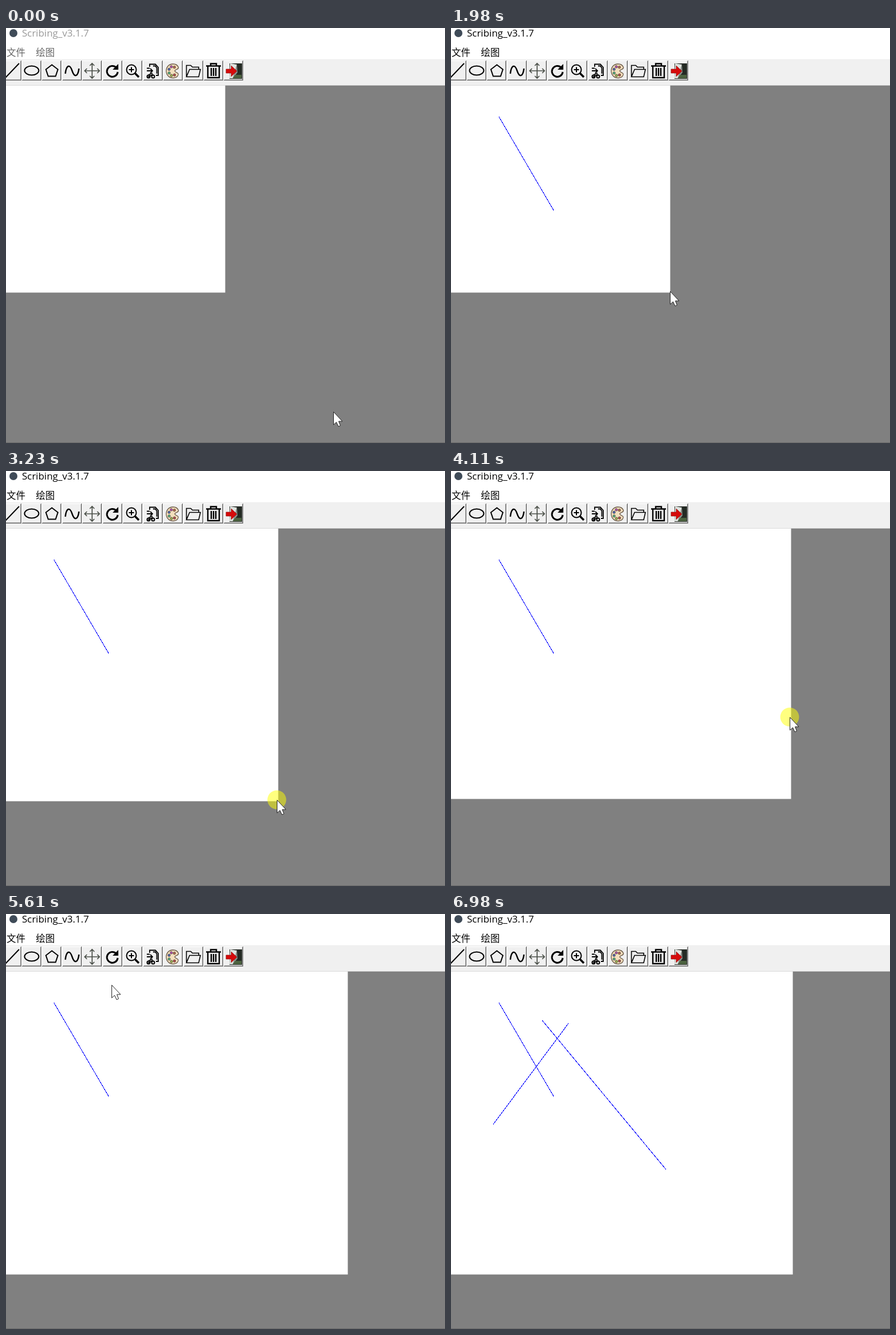
These frames come from a looping animation (770x727 px, 7.25 s). An HTML page:

```html
<!DOCTYPE html>
<html lang="zh">
<head>
<meta charset="utf-8">
<style>
  html, body { margin: 0; width: 100%; height: 100%; overflow: hidden; background: #808080; }
  svg { display: block; }
  #title { font: 17px "Open Sans", sans-serif; }
  .menu { font: 16.5px "Noto Sans CJK SC", "Noto Sans CJK", sans-serif; }
  .icon { fill: none; stroke: #000; stroke-width: 2; }
  .inactive #title { fill: #999; }
  .inactive .menu { fill: #666; }
</style>
</head>
<body>
<svg id="stage" width="770" height="727" viewBox="0 0 770 727">
  <rect width="770" height="55" fill="#fff"/>
  <rect y="54.6" width="770" height="46" fill="#f0f0f0"/>
  <rect y="726" width="770" height="1" fill="#696969"/>
  <circle cx="13" cy="9" r="7" fill="#3f4b58"/>
  <text id="title" x="28" y="15">Scribing_v3.1.7</text>
  <text class="menu" x="1" y="49">文件</text>
  <text class="menu" x="52.5" y="49">绘图</text>
  <g id="buttons" shape-rendering="crispEdges"></g>

  <g class="icon">
    <path d="M-1 87L23 62"/>
    <ellipse cx="45" cy="74.5" rx="12.5" ry="8"/>
    <path d="M80.5 64.5L91 72.5L87 84.5H74L70 72.5Z"/>
    <path d="M104 80C106 64 112 63 116 75S126 86 128 71" stroke-width="2.4"/>
    <path d="M138.5 75H164M151 62V88M142 71L138 75L142 79M160 71L164 75L160 79M147 66L151 62L155 66M147 84L151 88L155 84" stroke="#4a4f48" stroke-width="1.7"/>
    <path d="M192.5 68.5A9.5 9.5 0 1 0 196 77" stroke-width="3"/>
    <path d="M197 63V73H187Z" fill="#000" stroke="none"/>
    <circle cx="220" cy="73" r="8.5"/>
    <path d="M215.5 73H224.500M220 68.5V77.5"/>
    <path d="M226.5 79.5L233 86" stroke-width="3.5"/>
    <path d="M252 68V63.5H262L267 69V83H263M258 66.5H262L264.500 70V80M247 70.5H252M247 75H256M253 71L257 75L253 79M250 82L257 79M249 86L258 81" stroke-width="1.8"/>
    <circle cx="250" cy="85" r="2.5"/><circle cx="258" cy="85" r="2.5"/>
    <path d="M293 63C285 63 281 69 281 75C281 83 287 88 294 87.5C300 87 303 83 302 80C300 77 296 78 296 75C297 72 303 73 302.5 69C301 65 297 63 293 63Z" fill="#f3dfbd" stroke="#6b5b49" stroke-width="1.3"/>
    <g id="paints" stroke="#554b40" stroke-width=".8"></g>
    <path d="M316.5 85V65.5H324L327 68.5H338V72M316.5 85.5L322 72.5H341L338 85.5Z" stroke-width="1.6"/>
    <path d="M351 66.5H377M359 66V62.5H369V66M354 67V87H374V67M360 70V84M364 70V84M368 70V84" stroke-width="2.4"/>
  </g>
  <rect x="392" y="62" width="22" height="27" fill="#252b25"/>
  <path d="M393 62L405 64L398 88H392Z" fill="#dfe3df"/>
  <path d="M405 64L406 78L398 88Z" fill="#8b918b"/>
  <path d="M402 82H413V88H398Z" fill="#4c6340"/>
  <path d="M386 72H395V66L405 75.5L395 85V79H386Z" fill="#d60b0b" stroke="#8b1010" stroke-width=".7"/>

  <rect id="sheet" y="100.6" fill="#fff"/>
  <path id="lines" stroke="#00f" shape-rendering="crispEdges"/>
  <g id="pointer">
    <circle id="press" r="16.5" fill="#ff0" fill-opacity=".5"/>
    <path d="M.5 .5V23L5.5 18.5L9 26L12.5 24.5L9.5 17H16Z" fill="#fff" stroke="#222"/>
  </g>
</svg>
<script>
const $ = id => document.getElementById(id);
const TICK = 125, LOOP = 7250, FOCUS = 6, GRIP = 2.5;

function set(el, attrs) {
  for (const key in attrs) el.setAttribute(key, attrs[key]);
}

function add(parent, tag, attrs) {
  const el = document.createElementNS("http://www.w3.org/2000/svg", tag);
  set(el, attrs);
  parent.append(el);
}

// Raised toolbar buttons
for (let i = 0; i < 12; i++) {
  const x = Math.round(-8.5 + i * 35.45);
  const bevel = (d, stroke) => add($("buttons"), "path", { d, stroke, fill: "none" });
  bevel(`M${x + .5} 92V57.5H${x + 35}`, "#fff");
  bevel(`M${x + 1} 91.5H${x + 34.5}V57`, "#696969");
  bevel(`M${x + 2} 90.5H${x + 33.5}V58`, "#a0a0a0");
}

// Paint blobs around the palette
for (let i = 0; i < 6; i++) {
  const angle = 1 + i * .85;
  add($("paints"), "circle", {
    cx: 292 + 6.5 * Math.cos(angle), cy: 75.5 + 8 * Math.sin(angle),
    r: 2.2, fill: `hsl(${i * 75} 40% 50%)`
  });
}

// The pointer's path: each call goes on from where the last one ended
const path = [];
let last = { tick: 0, x: 574, y: 672 };

function move(tick, x, y, action, power = 1) {
  const end = { tick, x, y };
  path.push({ start: last, end, action, power });
  last = end;
}
const wait = tick => move(tick, last.x, last.y);

move(1, 105, 286);
move(4, 13, 88, "hide");
wait(FOCUS);
move(8, 84, 155);
move(11, 180, 319, "line");
move(16, 384, 461);
wait(20);
move(26, 475, 576, "corner", 1.5);
move(27, 477, 572, "corner");
move(30, 477, 430);
wait(32);
move(34, 597, 431, "right", .04);
move(37, 413, 572);
wait(40);
move(42, 413, 629, "bottom");
move(45, 185, 124);
move(47, 206, 191);
move(49, 74, 368, "line");
move(50, 160, 186);
move(52, 377, 447, "line");
move(55, 638, 696);
move(LOOP / TICK, 770, 727, "hide");

function along({ start, end, power }, tick) {
  const k = Math.min(1, (tick - start.tick) / (end.tick - start.tick)) ** power;
  const mix = axis => Math.round(start[axis] + (end[axis] - start[axis]) * k);
  return { x: mix("x"), y: mix("y") };
}

// Replays the path up to the given tick
function replay(tick) {
  const state = { width: 384.5, height: 463.5, lines: "" };
  for (const part of path) {
    const { start, action } = part;
    if (tick < start.tick || (action === "hide" && tick === start.tick)) break;
    const at = along(part, tick);
    if (action === "corner" || action === "right") state.width = at.x + GRIP;
    if (action === "corner" || action === "bottom") state.height = at.y + GRIP;
    if (action === "line") state.lines += `M${start.x + .1} ${start.y + .5}L${at.x + .1} ${at.y + .5}`;
    state.at = at;
    state.action = tick < part.end.tick ? action : "";
  }
  return state;
}

function draw(now) {
  const tick = Math.floor((now % LOOP + 20) / TICK);
  const { at, action, width, height, lines } = replay(tick);
  const hidden = action === "hide";
  set($("stage"), { class: tick < FOCUS ? "inactive" : "" });
  set($("sheet"), { width, height: height - 100.6 });
  set($("lines"), { d: lines });
  set($("pointer"), { transform: `translate(${at.x} ${at.y})`, display: hidden ? "none" : "inline" });
  set($("press"), { display: action ? "inline" : "none" });
}

const began = performance.now();
function loop() {
  draw(performance.now() - began);
  requestAnimationFrame(loop);
}
loop();
</script>
</body>
</html>
```
